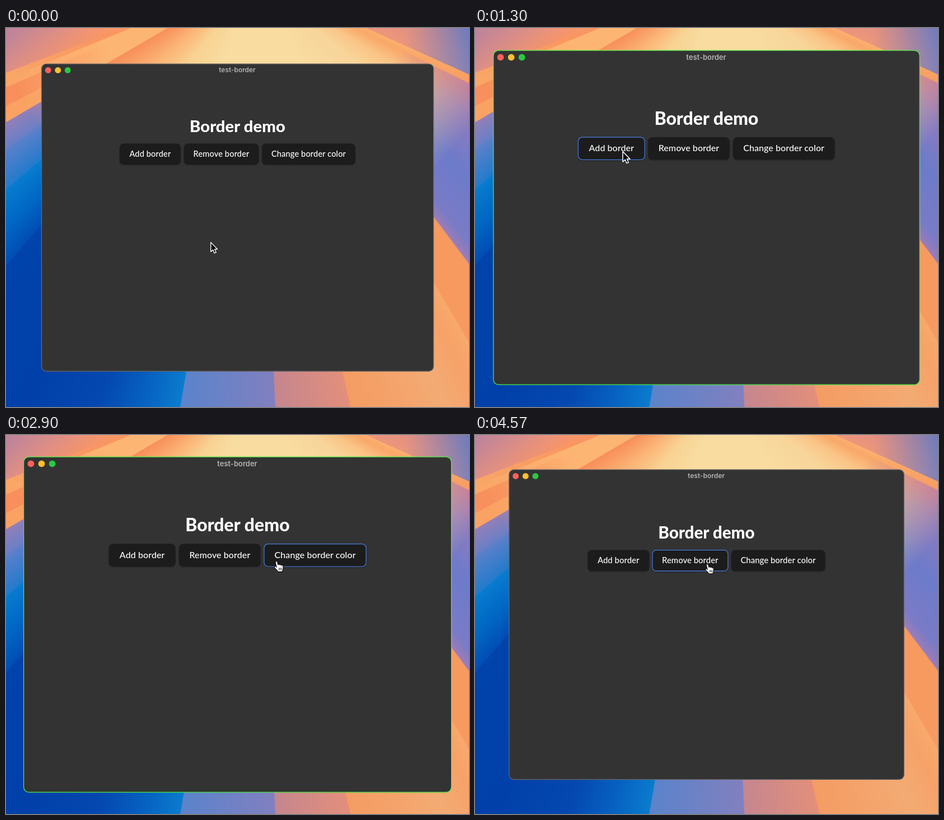
An HTML page that plays this animation: 827x677 px, repeating every 4730 ms.

```html
<!DOCTYPE html>
<html lang="en">
<head>
<meta charset="utf-8">
<title>Border demo</title>
<style>
  html, body { margin: 0; width: 100%; height: 100%; overflow: hidden; background: #f59a62; }
  .fan, svg { position: absolute; left: 0; top: 0; width: 827px; height: 677px; }
  /* Wallpaper: rays fanning out from one point above the stage */
  .far {
    background: conic-gradient(from 90deg at 443px -90px,
      #1a6fe8 12deg, #5b7ad0 24.2deg, #f79a60 24.3deg 26deg,
      #b678ac 26.3deg, #907bbe 33deg, #6c7bca 43deg, #7a7bc6 51deg, #9b7cb8 53deg,
      #f79a60 53.2deg 59.4deg, #f8a96c 59.6deg, #f6a268 62deg, #f3ab74 66deg, #f4a269 72deg, #f49c63 77.3deg,
      #e28f7b 77.4deg, #c5868f 87.1deg, #8180bf 87.2deg, #5b83cb 99.7deg,
      #0a7ccd 99.8deg, #0764c2 104deg, #0448b0 110deg, #0140a9 118deg, #0043ab 130.6deg,
      #004eb5 130.8deg, #0069c5 134.9deg, #0069c5 135.1deg, #087ccf 139.4deg,
      #247bcb 139.6deg, #5c80ca 145.3deg, #6b7fc6 145.5deg, #927fb9 149.7deg,
      #f9a263 149.8deg 152.5deg, #f88f5c 152.7deg 156deg, #f9a667 156.2deg 158.9deg,
      #de8f86 159.1deg, #b8829f 167deg);
  }
  .near {
    background: conic-gradient(from 90deg at 443px -90px,
      #d88c86 14deg, #ee967a 24.2deg, #fbb06f 24.3deg, #f9a869 26.5deg, #fac587 32deg, #f8d59a 40deg,
      #f8dca0 60deg, #f8dca0 110deg, #f8d393 127deg, #fbb476 139deg, #f88f5a 149.7deg,
      #fdb574 149.8deg 157.6deg, #fa9660 157.8deg, #f0947a 165deg);
    -webkit-mask-image: radial-gradient(circle at 443px -90px, #000 290px, transparent 470px);
    mask-image: radial-gradient(circle at 443px -90px, #000 290px, transparent 470px);
  }
  text { text-anchor: middle; }
  .title { font: 600 13px Inter, "Liberation Sans", sans-serif; fill: #b4b3b2; }
  .head { font: 800 32px Lato, "Open Sans", sans-serif; fill: #fff; }
  .label { font: 500 16px Lato, "Open Sans", sans-serif; letter-spacing: .1px; fill: #fff; }
</style>
</head>
<body>
<div class="fan far"></div>
<div class="fan near"></div>
<svg viewBox="0 0 827 677">
  <defs>
    <filter id="drop" x="-10%" y="-20%" width="120%" height="160%">
      <feDropShadow dx="0" dy="1.5" stdDeviation="1.2" flood-color="#000" flood-opacity=".3"/>
    </filter>
    <path id="arrow" d="M0 0V17.8L4.1 14.1L6.9 20.6L10 19.2L7.2 13H12.7Z" fill="#000" stroke="#fff" stroke-width="1.3" stroke-linejoin="round"/>
    <g id="hand" stroke="#000" stroke-width=".9" stroke-linejoin="round" stroke-linecap="round">
      <path fill="#fff" d="M-1.8 1.5C-1.8-.7 1.2-.9 1.6 1.2L2.8 6C3.2 4.6 5.6 4.8 6 6.3C6.8 5.2 8.8 5.6 9 7C10 6.2 11.8 7 11.8 8.4L11.9 12C11.9 14.5 10.6 15.5 10.4 18H2.8C2.4 15.8-1 13.4-3.2 10.6C-4.2 8.8-1.8 7.8-.6 9.4L.2 10.2Z"/>
      <path fill="none" d="M4.6 11.5V15M6.8 11.5V15M9 11.5V15"/>
    </g>
  </defs>
  <g id="scene">
    <rect id="frame" x="31.6" y="39" width="764" height="599.2" rx="9.5" fill="#333"/>
    <g id="lights"></g>
    <text class="title" x="413" y="55.6">test-border</text>
    <text class="head" x="413.4" y="172">Border demo</text>
    <g id="buttons"></g>
    <g id="cursor"></g>
  </g>
</svg>
<script>
const $ = id => document.getElementById(id);

function add(parent, tag, attrs, text) {
  const el = document.createElementNS("http://www.w3.org/2000/svg", tag);
  for (const k in attrs) el.setAttribute(k, attrs[k]);
  if (text) el.textContent = text;
  parent.appendChild(el);
  return el;
}

["#ff6159", "#ffbf2f", "#2ac940"].forEach((fill, i) =>
  add($("lights"), "circle", { cx: 44.4 + 19.1 * i, cy: 51.4, r: 5.9, fill }));

const buttons = [
  { label: "Add border", w: 119.2, hover: [1000, 2000] },
  { label: "Remove border", w: 146, hover: [4000, 4730] },
  { label: "Change border color", w: 182.2, hover: [2700, 3900] }
];
let left = 183.6;
for (const b of buttons) {
  b.box = add($("buttons"), "rect", {
    x: left, y: 194.6, width: b.w, height: 40.4, rx: 7.5, fill: "#1d1d1e", "stroke-width": 1.2, filter: "url(#drop)"
  });
  add($("buttons"), "text", { class: "label", x: left + b.w / 2, y: 219.8 }, b.label);
  left += b.w + 6.1;
}

const LOOP = 4730, CX = 413.6, CY = 338.6, FAR = 0.9165;
const SHUTTER = 18, COPIES = 6;
const copies = Array.from({ length: COPIES }, (_, i) => add($("cursor"), "use", { opacity: 1 / (i + 1) }));

// Pointer tip relative to the centre; arc bends a move downwards
const rest = { x: -52, y: 48.6 };
const moves = [
  { from: 200, to: 795, x: -150, y: -118, arc: 0 },
  { from: 1900, to: 2870, x: 69.5, y: -112.5, arc: 47 },
  { from: 3700, to: 4317, x: 1.6, y: -116.5, arc: 0 }
];

function pointer(t) {
  let { x, y } = rest;
  for (const m of moves) {
    const u = Math.max(0, Math.min(1, (t - m.from) / (m.to - m.from)));
    const s = u * u * (3 - 2 * u);
    x += (m.x - x) * s;
    y += (m.y - y) * s + m.arc * Math.sin(Math.PI * u);
  }
  return { x, y };
}

function spring(ms, rate) {
  const x = Math.max(0, ms) / 1000 * rate;
  return 1 - (1 + x) * Math.exp(-x);
}

const zoom = t => FAR + (1 - FAR) * (spring(t - 364, 5.35) - spring(t - 3848, 5.7));

function borderColor(t) {
  if (t < 1200 || t >= 4400) return "#6a6a69";
  return t < 3300 ? "#4df04a" : "#f0484a";
}

function step(t) {
  return t >= 4570 ? 4570 : Math.min(4400, Math.floor(t / 100) * 100);
}

function draw(time) {
  const t = step(time % LOOP), s = zoom(t);
  $("scene").setAttribute("transform", `translate(${CX} ${CY}) scale(${s}) translate(${-CX} ${-CY})`);
  $("frame").setAttribute("stroke", borderColor(t));
  $("frame").setAttribute("stroke-width", 1.25 / s);
  for (const b of buttons) {
    const on = t >= b.hover[0] && t < b.hover[1];
    b.box.setAttribute("stroke", on ? "#477de0" : "none");
  }
  const shape = t >= 2700 ? "#hand" : "#arrow";
  copies.forEach((c, i) => {
    const p = pointer(t - SHUTTER * i / (COPIES - 1));
    c.setAttribute("href", shape);
    c.setAttribute("transform", `translate(${CX + p.x} ${CY + p.y})`);
  });
}

const start = performance.now();
function tick() {
  draw(performance.now() - start);
  requestAnimationFrame(tick);
}
tick();
</script>
</body>
</html>
```
